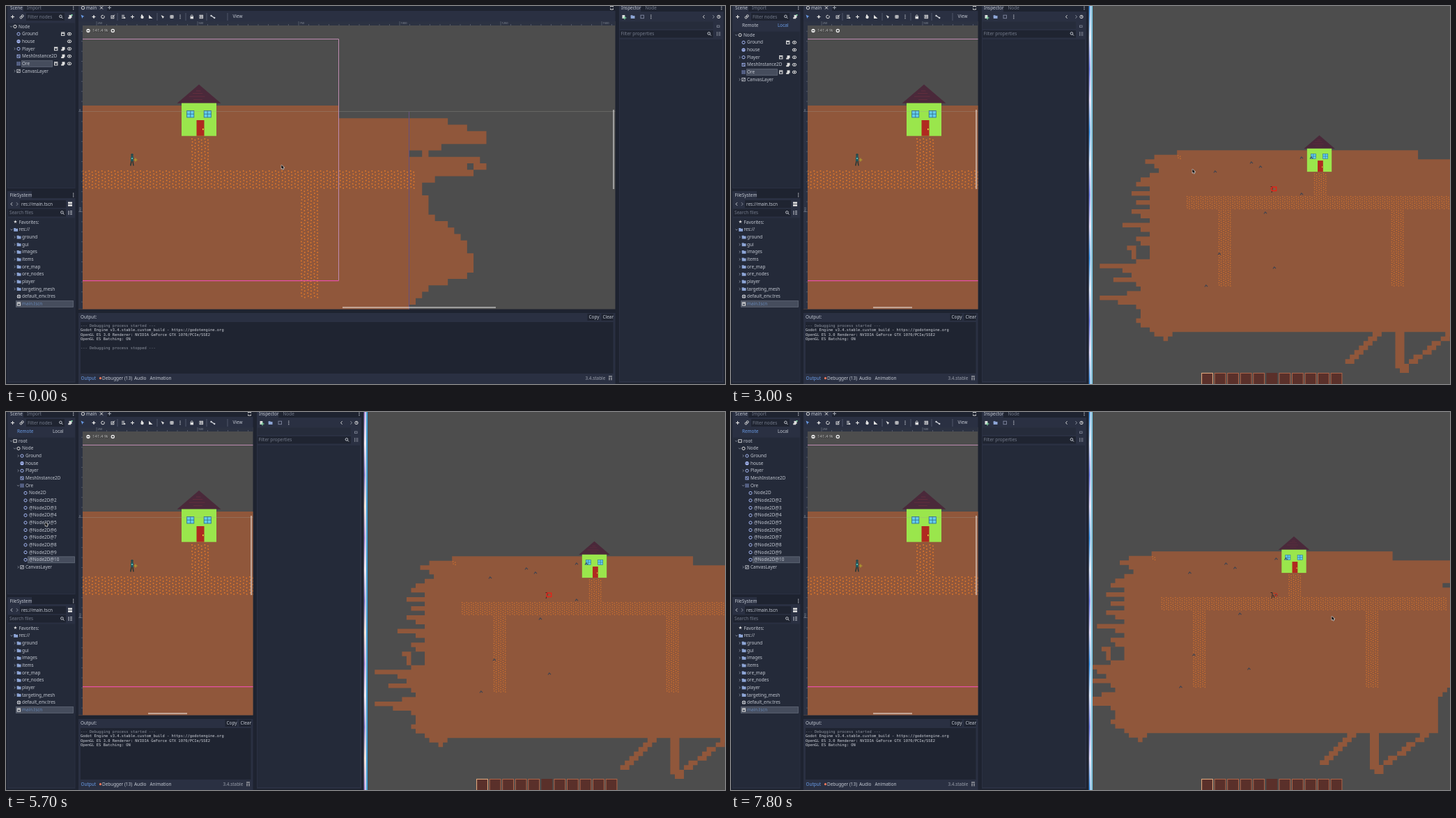
Recreate the animation shown at these times as an HTML page with a canvas. Size 1032 by 543 pixels, loop 8000 ms.

```html
<!DOCTYPE html>
<html>
<head>
<meta charset="utf-8">
<style>
html, body { margin: 0; width: 100%; height: 100%; overflow: hidden; background: #202531; }
canvas { display: block; }
</style>
</head>
<body>
<canvas id="stage" width="1032" height="543"></canvas>
<script>
const ctx = document.getElementById('stage').getContext('2d');
const LOOP = 8000, CELL = 9.23;
const GAP = '#1e2330', PANEL = '#2a3042', TREE = '#242a39', FIELD = '#1f2431';
const TEXT = '#c3c8d2', DIM = '#747b8b', BLUE = '#699ce8', NODE2D = '#a5b7f3', ICON = '#e0e0e0';
const GRAY = '#4d4d4d', SOIL = '#90573b';

// pointer path: time, x, y
const path = [
  [100, 395, 228], [600, 93, 90], [1000, 117, 29], [1100, 117, 29], [1700, 641, 209],
  [1900, 655, 211], [2000, 655, 211], [2100, 655, 215], [2900, 655, 215], [3000, 662, 234],
  [3100, 662, 234], [4000, 62, 99], [4300, 26, 109], [4400, 26, 109], [4700, 21, 31],
  [5100, 21, 31], [5500, 38, 151], [5600, 38, 151], [5700, 56, 158], [5800, 56, 158],
  [6700, 780, 262], [6800, 816, 270], [6900, 816, 271], [7600, 862, 293]
];
// ragged edges of the soil, in cells per row
const leftEdge = [0, 5, 7, 5, 4, 6, 8, 9, 6, 10, 6, 9, 6, 10, 8, 6, 12, 8, 6, 9, 8, 11, 10, 10, 9,
  17, 12, 10, 14, 9, 8, 11, 17, 13, 9, 8, 8, 9, 8, 6];
const rightEdge = [6, 9, 12, 12, 5, 0, 11, 12, 10, 4, 2, 2, 3, 3, 3, 4, 6, 7, 8, 9, 9, 10, 10, 10,
  9, 6, 3, 2, 1, 0];
const dots = [[.12, .1], [.6, .28], [.2, .58], [.66, .78]];
const ores = [[747, 225], [760, 231], [695, 238], [819, 218], [833, 218], [819, 270], [767, 297],
  [701, 356], [780, 376], [682, 402]];

function box(x, y, w, h, color) { ctx.fillStyle = color; ctx.fillRect(x, y, w, h); }
function frame(x, y, w, h, color, width = 1) {
  ctx.strokeStyle = color; ctx.lineWidth = width; ctx.strokeRect(x, y, w, h);
}
function line(color, width, ...p) {
  ctx.strokeStyle = color; ctx.lineWidth = width;
  ctx.beginPath();
  for (let i = 0; i < p.length; i += 2) ctx.lineTo(p[i], p[i + 1]);
  ctx.stroke();
}
function poly(color, ...p) {
  ctx.fillStyle = color;
  ctx.beginPath();
  for (let i = 0; i < p.length; i += 2) ctx.lineTo(p[i], p[i + 1]);
  ctx.fill();
}
function ring(x, y, r, color, width = 1) {
  ctx.strokeStyle = color; ctx.lineWidth = width;
  ctx.beginPath(); ctx.arc(x, y, r, 0, 7); ctx.stroke();
}
function disc(x, y, r, color) {
  ctx.fillStyle = color;
  ctx.beginPath(); ctx.arc(x, y, r, 0, 7); ctx.fill();
}
function text(s, x, y, color = TEXT, size = 6.4, font = '"Noto Sans", sans-serif') {
  ctx.font = `${size}px ${font}`;
  ctx.fillStyle = color;
  ctx.fillText(s, x, y + .3);
}
function plus(x, y, color = ICON) {
  line(color, 1.1, x - 2.5, y, x + 2.5, y); line(color, 1.1, x, y - 2.5, x, y + 2.5);
}
function cross(x, y) {
  line(ICON, 1, x - 2, y - 2, x + 2, y + 2); line(ICON, 1, x - 2, y + 2, x + 2, y - 2);
}
function search(x, y) { ring(x - .6, y - .6, 1.8, '#d0d3da', .9); line('#d0d3da', 1, x + .7, y + .7, x + 2.5, y + 2.5); }
function menu(x, y) { for (const d of [-2.3, 0, 2.3]) box(x - .6, y + d - .6, 1.2, 1.2, '#d0d3da'); }
function arrow(x, y, open, color = '#9097a5') {
  if (open) line(color, .8, x - 1.5, y - .8, x, y + .8, x + 1.5, y - .8);
  else line(color, .8, x - .8, y - 1.5, x + .8, y, x - .8, y + 1.5);
}
function eye(x, y) {
  ctx.strokeStyle = ICON; ctx.lineWidth = 1;
  ctx.beginPath(); ctx.ellipse(x, y, 2.8, 1.9, 0, 0, 7); ctx.stroke();
  disc(x, y, .9, ICON);
}
function clapper(x, y) { frame(x - 2, y - .8, 4.4, 3, ICON, 1); box(x - 2.5, y - 2.7, 5.4, 1.2, ICON); }
function script(x, y) { box(x - 1.5, y - 2.6, 4, 4, ICON); box(x - 2.8, y + .8, 4, 2, ICON); }
function folder(x, y) { box(x - 2.8, y - 2.3, 2.8, 2, '#8da5d6'); box(x - 2.8, y - 1.5, 5.8, 4, '#8da5d6'); }
function chain(x, y) { ring(x - 1, y + 1, 1.5, ICON); ring(x + 1.2, y - 1.2, 1.5, ICON); }

function nodeIcon(kind, x, y) {
  if (kind === 'root') frame(x - 2.2, y - 2, 4.4, 4, ICON, .9);
  else if (kind === 'node') ring(x, y, 2.1, ICON);
  else if (kind === '2d') ring(x, y, 2.1, NODE2D);
  else if (kind === 'sprite') { disc(x, y, 2.6, NODE2D); box(x - 1.3, y - .8, .9, 1.2, TREE); box(x + .5, y - .8, .9, 1.2, TREE); }
  else if (kind === 'mesh') { frame(x - 2, y - 2, 4, 4, NODE2D, .9); line(NODE2D, .8, x - 2, y - 2, x + 2, y + 2); }
  else if (kind === 'map') for (let i = 0; i < 9; i++) box(x - 2.6 + i % 3 * 1.9, y - 2.6 + (i / 3 | 0) * 1.9, 1.4, 1.4, '#7f8fc4');
  else { frame(x - 2.2, y - 2.2, 4.4, 4.4, '#d0d3da', .8); line('#d0d3da', .9, x - 1.5, y + 1.5, x + 1.5, y - 1.5); }
}

function house() {
  poly('#4a293a', 277, 112.7, 245.5, 139.7, 308.5, 139.7);
  for (const [y, w] of [[122, 4], [125.5, 9], [130, 14], [134.5, 8]])
    line('#6d3040', .7, 277 - w, y, 277 + w * .6, y);
  box(252, 139.5, 50, 47.2, '#9ae64c');
  for (const x of [259.5, 284]) {
    box(x, 150.2, 10.5, 10, '#63cdee');
    frame(x + .2, 150.4, 10.1, 9.6, '#2f6a88', .8);
    line('#2f6a88', .8, x + 5.2, 150, x + 5.2, 160);
    line('#2f6a88', .8, x, 155.2, x + 10.5, 155.2);
  }
  box(273.5, 164, 11, 22.7, '#b02a20');
  box(282, 176, 1.6, 2.2, '#e8d33c');
}

function gravel(col, row, cols, rows) {
  for (let r = 0; r < rows; r++) for (let c = 0; c < cols; c++)
    for (const [dx, dy] of dots)
      box(588 + (col + c + dx) * CELL, 235.2 + (row + r + dy) * CELL, 1.7, 1.7, '#e0792c');
}

function world() {
  const cells = (c, r, w, h) => ctx.rect(588 + c * CELL, 235.2 + r * CELL, w * CELL, h * CELL);
  ctx.beginPath();
  leftEdge.forEach((n, i) => {
    const right = i < 2 ? -12 : (rightEdge[i - 2] ?? -1) - 1;
    cells(-65 - n, i - 10, right + 65 + n, 1);
  });
  cells(1, -3, 1, 1);
  // roots under the soil
  cells(-70, 30, 4, 1); cells(-68, 31, 1, 1);
  cells(-17, 30, 2, 8); cells(-15, 37, 1, 2); cells(-16, 37, 1, 2);
  for (let k = 0; k < 7; k++) {
    cells(-22 - k, 30 + k, 2, 1);
    cells(-6 - Math.round(k * 1.3), 30 + k, 2, 1);
  }
  ctx.fillStyle = SOIL;
  ctx.fill();
  ctx.beginPath();
  cells(-74, 11, 3, 3); cells(8, -1, 1, 1);
  ctx.fillStyle = GRAY;
  ctx.fill();
  gravel(-63, 0, 63, 3);
  gravel(-35, -5, 3, 5);
  gravel(-18, 3, 3, 17);
  gravel(-56, 3, 3, 17);
  gravel(-65, -9, 1, 1);
  house();
}

function viewport(right) {
  ctx.save();
  ctx.beginPath(); ctx.rect(104, 22, right - 104, 413.5); ctx.clip();
  box(104, 22, right, 414, GRAY);
  world();
  line('rgba(160,160,150,.3)', 1, 110, 151.5, 875, 151.5);
  line('#66517f', 1, 578.5, 152, 578.5, 436);
  line('#bd8bb0', 1, 110, 47.5, 477.5, 47.5, 477.5, 394.5);
  line('#e650a8', 1.2, 110, 394.7, 477.5, 394.7);

  disc(181, 214, 1.9, '#274a4c');
  box(179, 216, 4, 7, '#23585c');
  box(180, 218, 2, 2, '#63b8b0');
  line('#1f3436', 1.4, 180, 223, 178.8, 229.5); line('#1f3436', 1.4, 182, 223, 183, 229.5);
  plus(186, 221, '#b8a52e');

  box(104, 22, right, 6, '#2c3242');
  box(104, 22, 6, 414, '#2c3242');
  for (let i = 0; i < 54; i++) {
    const x = 130 + i * 14.5, y = 151.5 + (i - 8) * 14.4;
    line('#5c6371', .8, x, i % 10 ? 26 : 22, x, 28);
    if (y > 28) line('#5c6371', .8, (i - 8) % 10 ? 108 : 104, y, 110, y);
  }
  for (let i = 0; i < 6; i++) text(250 + i * 250, 131.5 + i * 145, 24.6, '#8b919d', 4);
  text('0', 105, 149.5, '#8b919d', 4);
  ctx.save();
  ctx.translate(106.5, 296); ctx.rotate(-Math.PI / 2);
  text('250', 0, 0, '#8b919d', 4);
  ctx.restore();
  const wide = right > 500, bar = 'rgba(255,255,255,.45)';
  box(right - 3.5, 149, 2.2, 114, bar);
  box(wide ? 483 : 204, 432, wide ? 220 : 56, 2.2, bar);
  ctx.restore();

  disc(118, 35.5, 2.7, '#e6e6e6'); line('#333', .9, 116.5, 35.5, 119.5, 35.5);
  disc(153.3, 35.5, 2.7, '#e6e6e6'); line('#333', .9, 151.8, 35.5, 154.8, 35.5); line('#333', .9, 153.3, 34, 153.3, 37);
  text('141.4 %', 124.5, 35.7, '#292929', 6.1);
  text('141.4 %', 124, 35.3, '#bcbcbc', 6.1);
}

function toolbar(right) {
  box(104, 0, right - 104, 7, GAP);
  box(104, 0, 41, 8, PANEL);
  box(104, 7, right - 104, 15, PANEL);
  ring(110.5, 2.7, 2.2, ICON);
  text('main', 115, 2.5);
  cross(137, 2.5); plus(148.5, 2.3, '#9da3ae');
  poly(BLUE, 107.5, 12.5, 112.5, 15, 110.5, 15.5, 109.5, 18);
  plus(126, 15.5); ring(126, 15.5, 1, ICON);
  ring(139, 15.5, 2.3, ICON); box(139.6, 12, 2, 2, PANEL);
  frame(151, 14, 3.8, 3.8, ICON, .9); line(ICON, .9, 152, 17, 156, 12.6);
  for (let i = 0; i < 3; i++) line(ICON, .9, 166, 13.4 + i * 2, 170, 13.4 + i * 2);
  poly(ICON, 169, 15.5, 172, 17, 169.5, 18.5);
  plus(181.5, 15.5);
  disc(195.5, 16, 2.2, ICON); box(194, 12.5, 2, 4, ICON);
  poly(ICON, 205, 12.8, 210.5, 18, 205, 18);
  poly(ICON, 222.5, 13, 227, 15.2, 225, 18);
  frame(236, 13.5, 4, 4, ICON, .8); plus(238, 15.5);
  menu(250, 15.5);
  box(264.5, 15, 4.5, 3.4, ICON); ring(266.7, 14.5, 1.5, ICON, .9);
  frame(278, 13.2, 4.5, 4.5, ICON, .9); frame(279.5, 14.5, 1.7, 1.7, ICON, .8);
  line('#d0d3da', 1.3, 294.5, 14, 299, 17); disc(294.5, 14, 1.2, '#d0d3da'); disc(299.2, 17, 1.2, '#d0d3da');
  for (const x of [160, 217, 258, 288, 318]) line('#596174', .8, x, 10, x, 21);
  text('View', 325.5, 15.3);
  const x = right - 5;
  line(ICON, 1, x - 2, 1.5, x - 2, .4, x + 2, .4, x + 2, 1.5);
  line(ICON, 1, x - 2, 3.6, x - 2, 5, x + 2, 5, x + 2, 3.6);
}

function inspector(x) {
  box(x, 0, 150, 541, PANEL);
  box(x + 31, 0, 119, 8, GAP);
  text('Inspector', x + 3, 2.5);
  text('Node', x + 37.5, 2.5, DIM);
  menu(x + 147, 2.5);
  box(x + 4.5, 13, 3.8, 5, ICON); plus(x + 8, 17, '#7fd6a0');
  folder(x + 19.5, 15.5);
  frame(x + 31, 13.2, 4.5, 4.5, '#8088a0', .9);
  menu(x + 45.8, 15.5);
  line(ICON, 1, x + 122.5, 13.3, x + 120.5, 15.5, x + 122.5, 17.7);
  line('#8f95a2', 1, x + 134.5, 13.3, x + 136.5, 15.5, x + 134.5, 17.7);
  ring(x + 143, 15.5, 2.2, ICON, .9); line(ICON, .8, x + 143, 14, x + 143, 15.7, x + 144.2, 15.7);
  box(x + 1, 22.5, 134, 10.5, '#262c3b');
  frame(x + 140.5, 28, 3.6, 2.6, '#7b8291', .9);
  box(x + 1, 35, 134, 10.5, FIELD);
  text('Filter properties', x + 2.5, 40, DIM);
  search(x + 129.5, 40);
  for (let i = 0; i < 3; i++) line('#8f95a2', .9, x + 142.5, 38 + i * 2, x + 145.5, 38 + i * 2);
  line('#8f95a2', .9, x + 140.7, 37, x + 140.7, 43);
  box(x + 1, 48, 147, 491, TREE);
}

function output(right, phase) {
  const mono = (s, y, color = '#cdd0d8') => text(s, 107, y, color, 5.43, '"DejaVu Sans Mono", monospace');
  box(104, 441, right - 104, 102, PANEL);
  text('Output:', 107, 447);
  box(right - 40, 442, 17, 10, FIELD); box(right - 20, 442, 17, 10, FIELD);
  text('Copy', right - 38, 447); text('Clear', right - 18, 447);
  box(107, 454, right - 110, 74, FIELD);
  mono('--- Debugging process started ---', 459, '#8a909c');
  if (phase !== 'launch') {
    mono('Godot Engine v3.4.stable.custom_build - https://godotengine.org', 465.5);
    mono('OpenGL ES 3.0 Renderer: NVIDIA GeForce GTX 1070/PCIe/SSE2', 472);
    mono('OpenGL ES Batching: ON', 478.5);
  }
  if (phase === 'idle') mono('--- Debugging process stopped ---', 491.5, '#8a909c');
  text('Output', 107.5, 534.7, BLUE);
  const shift = phase === 'launch' ? 0 : 16;
  if (shift) { disc(135.5, 534.7, 1.6, '#ff7a5c'); text('Debugger (13)', 138, 534.7); }
  else text('Debugger', 134, 534.7);
  text('Audio', 168 + shift, 534.7);
  text('Animation', 190.5 + shift, 534.7);
  text('3.4.stable', right - 43, 534.7, '#9a9fab');
  const x = right - 7;
  line(ICON, .9, x - 2.5, 532, x + 2.5, 532);
  for (const d of [-1.5, 1.5]) line(ICON, .9, x + d, 537.5, x + d, 533.5);
}

function selected(x, y, w) {
  box(x, y - 4.7, w, 9.6, '#464d5d');
  frame(x + .4, y - 4.3, w - .8, 8.8, '#626978', .7);
}

function treeRow(y, depth, kind, name, fold, icons = '') {
  const x = 13 + depth * 5;
  if (fold) arrow(x - 5.5, y, fold === 'open');
  nodeIcon(kind, x, y);
  text(name, x + 5, y);
  if (icons.includes('c')) clapper(icons.includes('s') ? 71.5 : 81.5, y);
  if (icons.includes('s')) script(82, y);
  if (icons.includes('v')) eye(91, y);
}

function sceneDock(running, remote, loaded) {
  box(2, 0, 97.5, 262, PANEL);
  box(25, 0, 74.5, 8, GAP);
  text('Scene', 6, 2.5); text('Import', 30, 2.5, DIM); menu(96.7, 2.5);
  plus(9.5, 15.5); chain(22.5, 15.5);
  box(29, 10, 55, 11, FIELD);
  text('Filter nodes', 31, 15.5, DIM); search(79, 15.5);
  script(92, 15.5); box(93.5, 12, 2, 2, '#7fd6a0');
  let y = 29.5;
  if (running) {
    text('Remote', 16, 28, remote ? BLUE : TEXT);
    text('Local', 67, 28, remote ? TEXT : BLUE);
    y = 41.7;
  }
  box(3, y - 5, 95.5, 266 - y, TREE);
  const row = (...args) => { treeRow(y, ...args); y += 10.66; };
  if (!remote) {
    selected(22, y + 53.3, 45);
    row(0, 'node', 'Node', 'open');
    row(1, '2d', 'Ground', '', 'cv');
    row(1, 'sprite', 'house', '', 'v');
    row(1, '2d', 'Player', 'shut', 'csv');
    row(1, 'mesh', 'MeshInstance2D', '', 'sv');
    row(1, 'map', 'Ore', '', 'csv');
    row(1, 'layer', 'CanvasLayer', 'shut');
  } else if (loaded) {
    selected(31, 212.2, 68);
    row(0, 'root', 'root', 'open');
    row(1, 'node', 'Node', 'open');
    row(2, '2d', 'Ground', 'shut');
    row(2, 'sprite', 'house');
    row(2, '2d', 'Player', 'shut');
    row(2, 'mesh', 'MeshInstance2D');
    row(2, 'map', 'Ore', 'open');
    for (let i = 1; i <= 10; i++) row(3, '2d', i > 1 ? '@Node2D@' + i : 'Node2D');
    row(2, 'layer', 'CanvasLayer', 'shut');
  }
}

function fileDock() {
  box(2, 266, 97.5, 275, PANEL);
  box(37, 266, 62.5, 10, GAP);
  text('FileSystem', 5.5, 271.5); menu(96.7, 271.5);
  line('#d0d3da', 1, 9, 282.3, 7, 284.5, 9, 286.7);
  line('#8f95a2', 1, 15, 282.3, 17, 284.5, 15, 286.7);
  box(20, 279, 66, 11, FIELD);
  text('res://main.tscn', 22, 284.5);
  box(89, 281.5, 6, 2.6, ICON); box(89, 285, 6, 2.6, ICON);
  box(3, 291.5, 83, 11, FIELD);
  text('Search files', 5, 297, DIM); search(81, 297);
  for (let i = 0; i < 3; i++) line('#d0d3da', .9, 92, 294.7 + i * 2.2, 95, 294.7 + i * 2.2);
  line('#d0d3da', .9, 90, 294, 90, 300);
  box(3, 304.5, 95.5, 235, TREE);
  text('★', 10.5, 310.5, ICON, 6.5, '"DejaVu Sans", sans-serif');
  text('Favorites:', 18.5, 310.5);
  arrow(8, 321.3, true); folder(14, 321.3); text('res://', 18.5, 321.3);
  'ground gui images items ore_map ore_nodes player targeting_mesh'.split(' ').forEach((s, i) => {
    const y = 332 + i * 10.65;
    arrow(12.5, y); folder(18.5, y); text(s, 23, y);
  });
  disc(18.5, 417.2, 2.7, '#d0d3da'); line(TREE, .7, 16, 417.2, 21, 417.2); line(TREE, .7, 18.5, 414.7, 18.5, 420);
  text('default_env.tres', 23, 417.2);
  selected(14, 427.9, 83);
  clapper(18.2, 428); text('main.tscn', 23, 427.9, '#6685b3');
}

function game(t, focused) {
  const p = Math.min(1, Math.max(0, (t - 6900) / 700));
  ctx.save();
  ctx.beginPath(); ctx.rect(519, 0, 513, 543); ctx.clip();
  box(519, 0, 513, 543, GRAY);
  ctx.save();
  ctx.translate(-36.5 * p, -7 * p);
  ctx.save();
  ctx.translate(844.5, 186); ctx.scale(Math.SQRT1_2, Math.SQRT1_2); ctx.translate(-277, -113);
  world();
  ctx.restore();
  for (const [x, y] of ores) line('#3b4352', 1.1, x - 2, y + 1.5, x - .2, y - 1.2, x + 2, y + 1.2);
  ctx.restore();

  const step = Math.floor(t / 200) % 2;
  line('#2c2a2a', 1, 774.5, 259.5, 777, 259.5, 777, 263, 775 + step, 268);
  if (p > 0) {
    line('#2c2a2a', 1, 778, 263, 780, 267);
    line('#c9301c', 1, 778, 260, 784, 261, 783, 265, 779, 263);
  } else {
    frame(776.3, 260, 6.4, 5.5, '#f01c14', 1.2);
    if (focused) line('#d0241a', 1, 774, 262, 777, 264);
  }

  for (let i = 0; i < 11; i++) {
    const x = 675.6 + i * 18.55;
    box(x, 527, 16, 16, '#5a302a');
    if (i !== 5) frame(x, 527.4, 15.8, 17, i ? '#b0664a' : '#eab083', 1);
  }
  ctx.restore();
}

// sliver of desktop and window border between the two windows
function strip(focused) {
  const g = ctx.createLinearGradient(0, 0, 0, 543);
  const tones = focused ? ['#4f9fef', '#dfe9fb', '#7d8cec', '#e2dcfa'] : ['#a98fd8', '#efe3ee', '#8f86cf', '#f0dccf'];
  for (let i = 0; i <= 12; i++) g.addColorStop(i / 12, tones[i % 4]);
  box(512, 0, 7, 543, GAP);
  box(513.7, 0, 2.3, 543, g);
  box(516, 0, 1.3, 543, '#f4f8fc');
  box(517.3, 0, 1.7, 543, focused ? '#7fd0f0' : '#3aa6e6');
}

function pointerAt(t) {
  const i = path.findIndex(k => k[0] > t);
  if (i === 0) return path[0].slice(1);
  if (i < 0) return path[path.length - 1].slice(1);
  const [a, b] = [path[i - 1], path[i]], f = (t - a[0]) / (b[0] - a[0]);
  return [a[1] + (b[1] - a[1]) * f, a[2] + (b[2] - a[2]) * f];
}

function pointer(x, y) {
  ctx.save();
  ctx.translate(x + .3, y + .3);
  ctx.lineJoin = 'round';
  const p = [0, 0, 0, 5.4, 1.3, 4.4, 2.2, 6.4, 3.2, 6, 2.4, 4, 4, 3.9, 0, 0];
  line('#e8e8e8', 1.1, ...p);
  poly('#111', ...p);
  ctx.restore();
}

function draw(t) {
  const running = t >= 2400, inGame = t >= 3000;
  const width = inGame ? 512 : 1032, right = width - 157.5;
  const [x, y] = pointerAt(t);
  ctx.textBaseline = 'middle';
  box(0, 0, 1032, 543, GAP);
  sceneDock(running, t >= 4800, t >= 5200);
  fileDock();
  viewport(right);
  toolbar(right);
  output(right, inGame ? 'run' : running ? 'launch' : 'idle');
  inspector(width - 152);
  if (inGame) {
    strip(x > 516);
    game(t, x > 516);
  }
  pointer(x, y);
}

function tick(now) {
  draw(Math.floor(now % LOOP / 100) * 100);
  requestAnimationFrame(tick);
}
requestAnimationFrame(tick);
</script>
</body>
</html>
```
